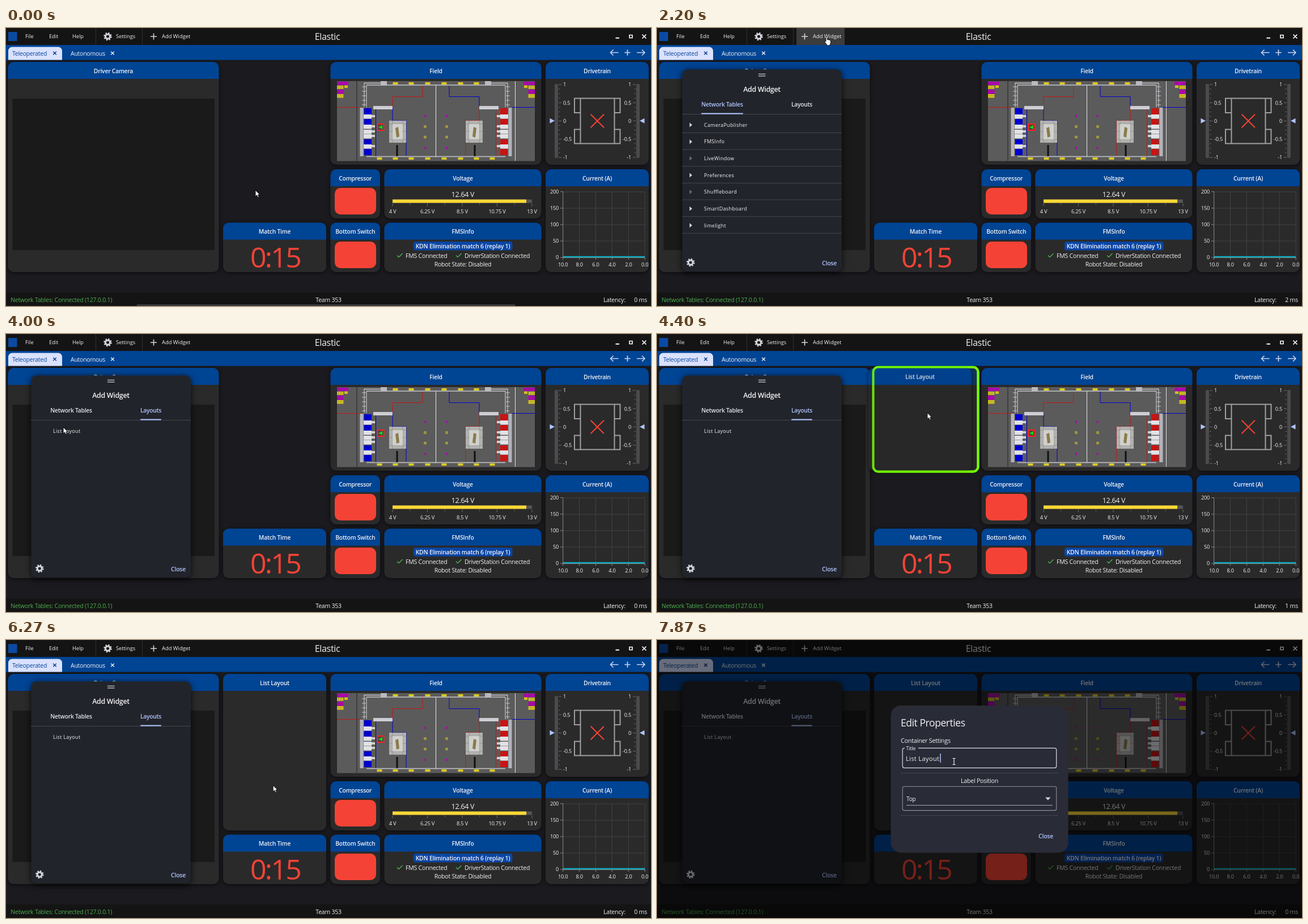
An HTML page for the animation above (8 s loop, 1138x492 px).

```html
<!DOCTYPE html>
<html lang="en">
<head>
<meta charset="utf-8">
<title>Dashboard</title>
<style>
html, body { margin: 0; width: 100%; height: 100%; overflow: hidden; background: #1a1a1f; }
svg { display: block; width: 1138px; height: 492px; }
text { font-family: "Open Sans", "Noto Sans", sans-serif; letter-spacing: -.024em; fill: #f2f2f4; white-space: pre; }
.b { font-weight: 600; }
.wide { letter-spacing: .3px; }
.flat { letter-spacing: 0; }
.m { text-anchor: middle; }
.e { text-anchor: end; }
.card { filter: drop-shadow(0 1px 3px #0009); }
.float { filter: drop-shadow(0 2px 6px #000c); }

/* One loop is 8 s, so 1% is 80 ms. */
.a { animation: 8s linear infinite; }
.step { animation: 8s step-end infinite; }
.step.bar { animation-name: bar; }
.step.lat0 { animation-name: lat0; }
.step.lat1 { animation-name: lat1; }
.step.lat2 { animation-name: lat2; }
.step.addHover { animation-name: addHover; }
.step.panel { animation-name: panel; }
.step.tabHover { animation-name: tabHover; }
.step.drag { animation-name: drag; }
.step.dropped { animation-name: dropped; }
.step.resizing { animation-name: resizing; }
.step.snap { animation-name: snap; }
.step.itemHover { animation-name: itemHover; }
.step.focus { animation-name: focus; }
.step.rim { animation-name: rim; }
.step.arrow { animation-name: arrow; }
.step.hand { animation-name: hand; }
.step.sizer { animation-name: sizer; }
.step.beam { animation-name: beam; }
.a.cursor { animation-name: cursor; animation-timing-function: ease-in-out; }
.a.ghost { animation-name: ghost; animation-timing-function: ease-in-out; }
.a.pages { animation-name: pages; animation-timing-function: ease; }
.a.mark { animation-name: mark; animation-timing-function: ease; }
.a.tabA { animation-name: tabA; }
.a.tabB { animation-name: tabB; }
.a.grow { animation-name: grow; }
.a.menu { animation-name: menu; }
.a.ripple { animation-name: ripple; transform-origin: 494px 294px; }
.a.dialog { animation-name: dialog; }

@keyframes bar { 0% { opacity: 1 } 15.9%, 100% { opacity: 0 } }
@keyframes lat0 { 0%, 39.5%, 70.2%, 100% { opacity: 1 } 20%, 52.5% { opacity: 0 } }
@keyframes lat1 { 0%, 62.5%, 100% { opacity: 0 } 52.5% { opacity: 1 } }
@keyframes lat2 { 0%, 39.5%, 70.2%, 100% { opacity: 0 } 20%, 62.5% { opacity: 1 } }
@keyframes addHover { 0%, 30.6%, 100% { opacity: 0 } 23% { opacity: 1 } }
@keyframes panel { 0% { opacity: 0 } 27.4%, 100% { opacity: 1 } }
@keyframes tabHover { 0%, 43.5%, 100% { opacity: 0 } 36.4% { opacity: 1 } }
@keyframes drag { 0%, 58.7%, 100% { opacity: 0 } 52.4% { opacity: 1 } }
@keyframes dropped { 0% { opacity: 0 } 58.7%, 100% { opacity: 1 } }
@keyframes resizing { 0%, 75.4%, 100% { opacity: 0 } 70% { opacity: .75 } }
@keyframes snap { 0% { height: 185px } 71.6%, 100% { height: 280px } }
@keyframes itemHover { 0% { opacity: 0 } 86.5%, 100% { opacity: 1 } }
@keyframes focus { 0% { opacity: 0 } 96.9%, 100% { opacity: 1 } }
@keyframes rim { 0% { stroke: #8f9099 } 96.9%, 100% { stroke: #dcdde6 } }
@keyframes arrow {
  0%, 29.9%, 43%, 76.6%, 92.6% { opacity: 1 }
  23%, 36.4%, 66.9%, 86.5%, 96.4%, 100% { opacity: 0 }
}
@keyframes hand {
  0%, 29.9%, 43%, 92.6%, 100% { opacity: 0 }
  23%, 36.4%, 86.5% { opacity: 1 }
}
@keyframes sizer { 0%, 76.6%, 100% { opacity: 0 } 66.9% { opacity: 1 } }
@keyframes beam { 0% { opacity: 0 } 96.4%, 100% { opacity: 1 } }
@keyframes cursor {
  0%, 15.9% { transform: translate(440px, 287px) }
  23.7%, 29.4% { transform: translate(299px, 15px) }
  37.4%, 41.6% { transform: translate(257px, 134px) }
  48.5%, 50% { transform: translate(101px, 165px) }
  54.4%, 60.9% { transform: translate(477px, 139.5px) }
  67.5%, 70% { transform: translate(484px, 240px) }
  70.875% { transform: translate(484px, 315px) }
  72%, 75.6% { transform: translate(484px, 336px) }
  79.1%, 84.5% { transform: translate(470px, 250px) }
  88.5%, 94.1% { transform: translate(494px, 288px) }
  97.5%, 100% { transform: translate(524px, 215px) }
}
@keyframes ghost {
  0%, 50% { transform: translate(-376px, 25.5px) }
  54.4%, 100% { transform: none }
}
@keyframes pages { 0%, 39% { transform: none } 42.75%, 100% { transform: translateX(-282px) } }
@keyframes mark { 0%, 39% { x: 78px; width: 74px } 42.75%, 100% { x: 237px; width: 37px } }
@keyframes tabA { 0%, 39% { fill: #b0c6ff } 41%, 100% { fill: #e3e4ec } }
@keyframes tabB { 0%, 39% { fill: #e3e4ec } 41%, 100% { fill: #b0c6ff } }
@keyframes grow { 0%, 70% { height: 182px } 70.875% { height: 221px } 73%, 100% { height: 277px } }
@keyframes menu { 0%, 83.4% { opacity: 0 } 84.6%, 91.9% { opacity: 1 } 92.8%, 100% { opacity: 0 } }
@keyframes ripple { 0%, 90% { transform: scale(.1); opacity: 0 } 90.2% { opacity: 1 } 91.9%, 100% { transform: scale(1.6); opacity: 1 } }
@keyframes dialog { 0%, 91.7% { opacity: 0 } 93.4%, 100% { opacity: 1 } }
</style>
</head>
<body>
<script>
const BLUE = '#004494', RED = '#f44336', SKY = '#b0c6ff', GREEN = '#76ff03', EDGE = '#45464f';

// y is the middle of the capitals
const T = (x, y, s, size, cls = '', fill = '') =>
  `<text x="${x}" y="${(y + size * .36).toFixed(2)}" font-size="${size}" class="${cls}"${fill && ` style="fill:${fill}"`}>${s}</text>`;
const R = (x, y, w, h, fill, rx = 0, more = '') =>
  `<rect x="${x}" y="${y}" width="${w}" height="${h}" fill="${fill}" rx="${rx}" ${more}/>`;
const P = (d, stroke, w = 1, more = '') =>
  `<path d="${d}" fill="none" stroke="${stroke}" stroke-width="${w}" ${more}/>`;
const F = (d, fill) => `<path d="${d}" fill="${fill}"/>`;
const G = (cls, ...kids) => `<g class="${cls}">${kids.join('')}</g>`;
const each = (list, fn) => list.map(fn).join('');
const range = n => [...Array(n).keys()];

const cross = (x, y, r, c, w) => P(`M${x - r} ${y - r}l${2 * r} ${2 * r}m0 ${-2 * r}l${-2 * r} ${2 * r}`, c, w);
const plus = (x, y, r, c, w) => P(`M${x - r} ${y}h${2 * r}m${-r} ${-r}v${2 * r}`, c, w);
const gear = (x, y) => `<g fill="none" stroke="#d4d5da"><circle cx="${x}" cy="${y}" r="6" stroke-width="2.6" stroke-dasharray="2.356"/>
  <circle cx="${x}" cy="${y}" r="4" stroke-width="3"/></g>`;

const card = (x, y, w, h, title, bodyCls = '') => G('card',
  R(x, y, w, h, '#2a2a2a', 10, `class="${bodyCls}"`),
  F(`M${x} ${y + 30}v-20a10 10 0 0 1 10-10h${w - 20}a10 10 0 0 1 10 10v20z`, BLUE),
  T(x + w / 2, y + 15.8, title, 10.4, 'b m'));

function topBar() {
  return R(0, 0, 1138, 30, '#141414') + R(246, 0, 85, 30, '#3c3c3c', 0, 'class="step addHover"')
    + R(4, 7, 15.5, 16, '#0b4aa2')
    + T(34, 15, 'File', 9.2, 'flat') + T(76, 15, 'Edit', 9.2, 'flat') + T(117, 15, 'Help', 9.2, 'flat')
    + P('M158.5 0v30M240.5 0v30', '#303030')
    + gear(179.5, 15) + T(194, 15, 'Settings', 9.2, 'flat')
    + plus(260.5, 15, 5.5, '#d4d5da', 1.6) + T(275, 15, 'Add Widget', 9.4, 'flat')
    + T(567, 15.5, 'Elastic', 16.2, 'm')
    + P('M1075.5 17.7h6.5', '#fff', 2) + P('M1100 12.5h5v5h-5z', '#fff', 1.6) + cross(1126, 15, 3.5, '#fff', 1.7)
    + R(0, 30, 1138, 26.5, BLUE)
    + F('M4 56.5v-16a7 7 0 0 1 7-7h81a7 7 0 0 1 7 7v16z', '#dae2ff')
    + T(11, 45, 'Teleoperated', 10.5, '', '#0b4596') + cross(86, 44.5, 2.8, '#0b3a80', 1.4)
    + T(114, 45, 'Autonomous', 10.5) + cross(188, 44.5, 2.8, '#f2f2f4', 1.4)
    + P('M1080.5 43.5h-14m5-5l-5 5l5 5M1113 43.5h14m-5-5l5 5l-5 5', '#c9d3ee', 1.6) + plus(1096.5, 43.5, 5.2, '#c9d3ee', 1.7);
}

// Left half of the field; the right half is its mirror with swapped colours.
function halfField(own, other) {
  const wall = '#c6c6cc';
  return P('M584 140.5h41', other, 1.2) + R(624.5, 141, 6, 86, '#b3b3bb') + P('M632 97v43M636 101v39', wall, 1.2)
    + each(range(5), i => P(`M628 ${104 + 8 * i}h7`, wall))
    + P('M632 97.5h40M636 101h123M636 227.5h123', wall, 1.3) + R(661, 94, 11, 8, '#b9b9bf')
    + P('M735 102v19.5h-53v18', other) + P('M682 139v25h24v62M652.5 141v86', own)
    + R(648, 138, 34, 6, '#cdcdd3')
    + each([142, 161, 197, 214], y => R(632, y, 13, 11, own))
    + each([153, 171, 180, 188, 206], y => R(631, y, 14, 7.5, '#e2e2e6') + R(645, y + 1, 6, 4, '#cfcfd4'))
    + R(676, 164, 30, 39, '#b2b2b0') + P('M682 164v39M700 164v39M676 170h30M676 197h30M676 183h6M700 183h6', '#8f8f8f', .8)
    + R(682, 170, 18, 27, '#d0d0cd') + F('M687 177l5-2l2 17l-5 2z', '#8a7a4c') + R(688.5, 207, 3, 20, '#111')
    + each([687, 715, 744], x => R(x - 4.5, 96, 9, 4, '#dcca24')) + each([659, 687, 715, 744], x => R(x - 4.5, 229, 9, 4, '#dcca24'))
    + each([155.5, 212], y => `<circle cx="739.7" cy="${y}" r="1.9" fill="#b000b0"/>`)
    + each([174.5, 193], y => R(738, y - 1.5, 3, 3, '#555', 0, 'stroke="#e0d020"'))
    + R(584, 95, 20, 6, '#b000b0') + R(584, 109, 11.5, 7.5, '#b000b0')
    + R(584, 102, 11.5, 6, '#d2c01e') + R(597, 101.5, 6, 4.5, '#d2c01e') + R(584, 117, 11.5, 6.5, '#d2c01e')
    + P('M586 104h9M586 107h9M586 120h9M586 98h17M586 112h9', '#5a5a5a', .7, 'stroke-dasharray="2 2"');
}

function field() {
  return card(572.5, 60, 372, 182, 'Field') + R(584, 94, 349, 141.5, '#5b5b5b')
    + P('M619 94v141', '#252525') + P('M898.5 94v141', '#e2e2e2')
    + halfField('#0000d0', '#c81414')
    + `<g transform="translate(1517) scale(-1 1)">${halfField('#c81414', '#0000d0')}</g>`
    + P('M758.5 102v125', '#e6e6e6')
    + R(655.5, 170, 11, 11, '#444', 0, 'stroke="#ff2020" stroke-width="2"') + F('M657 175.5l7-3.5v7z', '#10e010');
}

function gauge(x, dir) {
  const names = ['1', '0.5', '0', '-0.5', '-1'];
  return R(x - 3, 99, 6, 131, '#4b4b4e', 2)
    + each(range(17), i => P(`M${x + 4 * dir} ${100 + i * 8.06}h${(i % 4 ? 2.5 : 5) * dir}`, '#77777a', .9))
    + each(names, (s, i) => T(x + 12 * dir, 100 + i * 32.25, s, 9.2, dir < 0 ? 'e' : ''))
    + F(`M${x - 3 * dir} 164.3l${-8.5 * dir}-4.5v9z`, SKY);
}

function drivetrain() {
  return card(952, 60, 182, 182, 'Drivetrain') + gauge(971, 1) + gauge(1115, -1)
    + R(1013.5, 124.5, 60, 80, 'none', 0, 'stroke="#a0a0a2" stroke-width="2"')
    + P('M1013 124.5h-10v25.5h10M1013 179.5h-10v25h10M1074 124.5h9.5v25.5h-9.5M1074 179.5h9.5v25h-9.5', '#a0a0a2', 2)
    + cross(1043.3, 164.5, 11.7, RED, 2);
}

function voltage() {
  return card(667.5, 250, 277, 87, 'Voltage') + T(806, 294, '12.64 V', 12.5, 'm')
    + R(682, 303.5, 246, 6, '#555558') + R(682, 303.5, 236, 6, '#fdd835')
    + each(range(9), i => P(`M${682 + i * 30.75} 310.5v${i % 2 ? 3 : 5}`, '#77777a', .9))
    + each(['4 V', '6.25 V', '8.5 V', '10.75 V', '13 V'], (s, i) => T(682 + i * 61.5, 324.5, s, 9.3, 'm'));
}

function current() {
  return card(952, 250, 182, 182, 'Current (A)')
    + each(range(5), i => P(`M${1011.5 + i * 28.9} 290v116M983 ${290 + i * 29}h144`, '#47474c', .9))
    + each(range(5), i => P(`M978 ${289.7 + i * 29.1}h5`, '#8a8a8e') + T(975, 290 + i * 29, String(200 - i * 50), 9.2, 'e'))
    + each(range(6), i => P(`M${982.7 + i * 28.9} 406v4`, '#8a8a8e') + T(982.7 + i * 28.9, 418.5, (10 - 2 * i).toFixed(1), 9.2, 'm'))
    + P('M982.7 289.5v117h144.5', '#8a8a8e') + P('M983 404.8h144', '#00bcd4', 2);
}

function info() {
  const tick = (x, y) => P(`M${x} ${y}l3 3l6.5-6.5`, '#4caf50', 1.5);
  return card(667.5, 344.5, 277, 87.5, 'FMSInfo') + R(719, 378, 174.5, 15.5, '#0a46a5', 4)
    + T(806, 386, 'KDN Elimination match 6 (replay 1)', 10.45, 'b m')
    + tick(690, 402.5) + T(705, 403, 'FMS Connected', 10.6)
    + tick(794, 402.5) + T(809, 403, 'DriverStation Connected', 10.6)
    + T(806, 418.5, 'Robot State: Disabled', 10.6, 'm');
}

function listLayout() {
  const outline = cls => R(381.5, 58.5, 185, 185, 'rgba(255,255,240,.025)', 9, `stroke="${GREEN}" stroke-width="4" class="${cls}"`);
  return G('step dropped', card(383, 60, 182, 182, 'List Layout', 'a grow'))
    + G('step drag', `<g opacity=".5">${card(383, 60, 182, 182, '')}</g>`,
        outline(''), `<g opacity=".88">${G('a ghost', card(373, 60, 182, 182, 'List Layout'))}</g>`,
        R(381.5, 58.5, 185, 185, 'none', 9, `stroke="${GREEN}" stroke-width="4" opacity=".85"`))
    + G('step resizing', outline('step snap'));
}

function footer() {
  const latency = n => G(`step lat${n}`, T(1131, 481, `${n} ms`, 10.6, 'e'));
  return R(0, 468, 1138, 24, '#141414') + T(8, 481, 'Network Tables: Connected (127.0.0.1)', 10.6, '', '#4caf50')
    + T(569, 481, 'Team 353', 10.5, 'm') + T(1054, 481, 'Latency:', 10.6) + each([0, 1, 2], latency)
    + R(230.5, 489, 668, 3, '#3a3a3c', 1.5, 'class="step bar"');
}

function addPanel() {
  const rows = ['CameraPublisher', 'FMSInfo', 'LiveWindow', 'Preferences', 'Shuffleboard', 'SmartDashboard', 'limelight'];
  const row = (s, i) => {
    const y = 171.5 + i * 29.63;
    return F(`M57.5 ${y - 4}l4.5 4l-4.5 4z`, i === 2 || i === 4 ? '#6b6c72' : '#d4d5da')
      + T(83, y, s, 9, 'wide') + P(`M44 ${y + 14}h282`, EDGE);
  };
  return G('step panel',
    G('float', R(44.5, 73.5, 281.5, 357.5, '#22242b', 9)),
    P('M179 81.5h12.5M179 85h12.5', '#b4b5bc', 1.4), T(185, 109, 'Add Widget', 12.4, 'b m'),
    R(185, 117, 141, 35.5, '#3c4156', 0, 'class="step tabHover"'),
    T(115, 135, 'Network Tables', 10.3, 'b m a tabA'), T(255.5, 135, 'Layouts', 10.3, 'b m a tabB'),
    P('M44 152.5h282', EDGE), R(78, 150.5, 74, 2, SKY, 1, 'class="a mark"'),
    '<g clip-path="url(#page)">' + G('a pages', each(rows, row), T(365, 171.5, 'List Layout', 9, 'wide')) + '</g>',
    gear(59.3, 415), T(304, 416, 'Close', 10.5, 'b m', SKY));
}

function contextMenu() {
  return G('a menu',
    G('float', R(470, 250, 128, 83, '#222227', 5)),
    T(478, 265.5, 'List Layout', 9.6, 'flat', '#74757c'), P('M473 279.5h122', '#44454c'),
    G('step itemHover', R(473, 282, 122, 24.5, '#48494d', 3),
      '<g clip-path="url(#item)"><circle class="a ripple" cx="494" cy="294" r="31" fill="#66676c"/></g>'),
    F('M480 299v-2.6l6-6l2.6 2.6l-6 6zM486.8 289.6l1-1l2.6 2.6l-1 1z', '#e6e6ea'),
    T(499, 294.3, 'Edit Properties', 9.7, 'flat', '#d2d3d8'),
    P('M480.5 314.5h7.5M482.6 313.4h3.2M481.3 315.5v6.7h5.9v-6.7', '#c4c5ca', 1.2),
    T(499, 318, 'Remove', 9.7, 'flat', '#c4c5ca'));
}

function dialog() {
  const fill = '#292b36';
  return G('a dialog',
    R(0, 0, 1138, 492, '#000', 0, 'opacity=".52"'),
    R(412.5, 116, 313, 260.5, fill, 18),
    T(430, 147, 'Edit Properties', 17.5), T(430, 178, 'Container Settings', 10.8),
    R(433.2, 191.3, 271.5, 35, 'none', 3, 'stroke="#8f9099" stroke-width="1.2" class="step rim"'),
    R(437, 189, 24, 5, fill), T(439.5, 191.8, 'Title', 9),
    T(439, 209.5, 'List Layout', 11.2, 'wide'), R(499.3, 201, 1.5, 16, SKY, 0, 'class="step focus"'),
    P('M430 235.5h278M430 310.5h278', EDGE), T(569, 249.5, 'Label Position', 10.7, 'm'),
    R(433.2, 259.3, 271.5, 42.3, 'none', 3, 'stroke="#8f9099" stroke-width="1.1"'),
    T(440, 281, 'Top', 10.2), P('M440 292.5h258', '#a9aab3'), F('M685 278.5h9.5l-4.75 5z', '#d4d5da'),
    T(686, 347, 'Close', 10.5, 'b m', SKY));
}

function pointer() {
  const ink = 'fill="#fff" stroke="#000" stroke-width=".9" stroke-linejoin="round"';
  return G('a cursor',
    `<path class="step arrow" ${ink} d="M0 0v11.2l2.6-2.4l1.7 3.9l2-.9l-1.7-3.8h3.5z"/>`,
    `<path class="step hand" ${ink} d="M-1 1.2a1.2 1.2 0 0 1 2.4 0v4.6l1-.3l1.6.4l1.4.3l1.3.5l.8 1v3.8l-1.4 2.6v1.8h-5.6v-1.6l-3.3-4.1a1.2 1.2 0 0 1 1.8-1.5z"/>`,
    `<path class="step sizer" ${ink} d="M0-7.5l3.4 3.6h-2.6v7.8h2.6l-3.4 3.6l-3.4-3.6h2.6v-7.8h-2.6z"/>`,
    '<g class="step beam">' + P('M-2.5-5.5h2l.5.5l.5-.5h2M0-5v10M-2.5 5.5h2l.5-.5l.5.5h2', '#fff', 1.1) + '</g>');
}

const stage = [
  R(0, 0, 1138, 492, '#1a1a1f'),
  card(3.5, 60, 372, 372, 'Driver Camera'), R(11.5, 125, 356.5, 268, '#1a1a1a'),
  card(383, 344.5, 182, 87.5, 'Match Time'),
  `<text x="475" y="423.5" font-size="50" class="m" style="fill:${RED};letter-spacing:-.055em">0:15</text>`,
  card(572.5, 250, 87.5, 87, 'Compressor'), R(580, 283, 73, 47, RED, 10),
  card(572.5, 344.5, 87.5, 87.5, 'Bottom Switch'), R(580, 378, 73, 47, RED, 10),
  field(), voltage(), info(), drivetrain(), current(),
  listLayout(), topBar(), footer(), addPanel(), contextMenu(), dialog(), pointer()
];

document.body.innerHTML = `<svg viewBox="0 0 1138 492">
  <clipPath id="page"><rect x="44.5" y="153" width="281.5" height="240"/></clipPath>
  <clipPath id="item"><rect x="473" y="282" width="122" height="24.5" rx="3"/></clipPath>
  ${stage.join('')}</svg>`;
</script>
</body>
</html>
```
